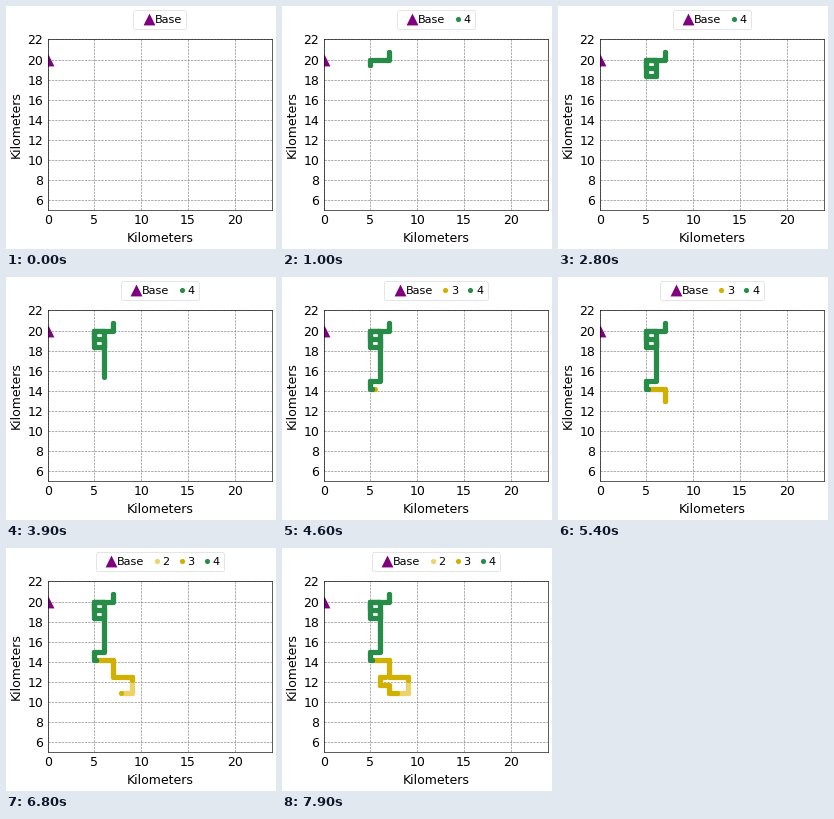
A matplotlib script for the animation above (8 s loop, 270 by 243 pixels).

```python
import numpy as np
import matplotlib.pyplot as plt
from matplotlib.animation import FuncAnimation

W, H, DPI = 270, 243, 90
FRAMES, STEP = 80, 100
LEFT, RIGHT, TOP, BOTTOM = 41.7, 266, 33.48, 203.8  # plot box in pixels

plt.rcParams["font.family"] = "DejaVu Sans"
plt.rcParams["font.size"] = 10

# The drive, one letter per street block
MOVES = "DLLDRDLUURDDDDDDLDRRDDRRDDLLULUR"
BLOCK = {"L": (-1, 0), "R": (1, 0), "U": (0, 5 / 6), "D": (0, -5 / 6)}
START = (7, 20 + 5 / 6)
corners = np.cumsum([START] + [BLOCK[m] for m in MOVES], axis=0)

# Fine samples of the drive; time is counted in frames
time = np.linspace(1, FRAMES - 1, 8 * (FRAMES - 2) + 1)
# Steady pace in blocks, slightly ahead for a while midway
dist = 0.07 + 0.4037 * (time - 1) + 0.24 * np.exp(-((time - 44) / 6) ** 2)
nodes = np.arange(len(corners))
trail = np.column_stack([np.interp(dist, nodes, c) for c in corners.T])
level = np.select([dist < 18.2, dist < 24.4, dist < 27.1], [4, 3, 2], 3)

COLORS = {2: "#ecd268", 3: "#d0b000", 4: "#288c49"}

fig = plt.figure(figsize=(W / DPI, H / DPI), dpi=DPI, facecolor="white")
ax = fig.add_axes([LEFT / W, 1 - BOTTOM / H,
                   (RIGHT - LEFT) / W, (BOTTOM - TOP) / H])
ax.set(xlim=(0, 24), ylim=(5, 22), xticks=range(0, 21, 5),
       yticks=range(6, 23, 2), xlabel="Kilometers", ylabel="Kilometers")
ax.tick_params(length=0)
ax.grid(color="gray", linestyle="--", linewidth=0.5)
ax.set_axisbelow(True)
for spine in ax.spines.values():
    spine.set_linewidth(0.5)

base = ax.scatter([0], [20], s=90, marker="^", color="purple",
                  linewidths=0, label="Base", zorder=2)
dots = {k: ax.scatter([], [], s=17, color=c, linewidths=0,
                      label=str(k), zorder=2 + k / 10)
        for k, c in COLORS.items()}


def draw(frame):
    handles = [base]
    for k, dot in dots.items():
        seen = (time <= frame + 1e-6) & (level == k)
        dot.set_offsets(trail[seen])
        if seen.any():
            handles.append(dot)
    legend = ax.legend(
        handles=handles, loc="center", ncol=4, fontsize=9,
        bbox_to_anchor=((LEFT + RIGHT) / 2 / W, 1 - 14 / H),
        bbox_transform=fig.transFigure, scatterpoints=1,
        scatteryoffsets=[0.5], handletextpad=-0.5, columnspacing=0.1,
        borderaxespad=0)
    legend.get_frame().set_linewidth(0.5)
    return []


anim = FuncAnimation(fig, draw, frames=FRAMES, interval=STEP,
                     repeat=True, repeat_delay=0, blit=False)
plt.show()
```
